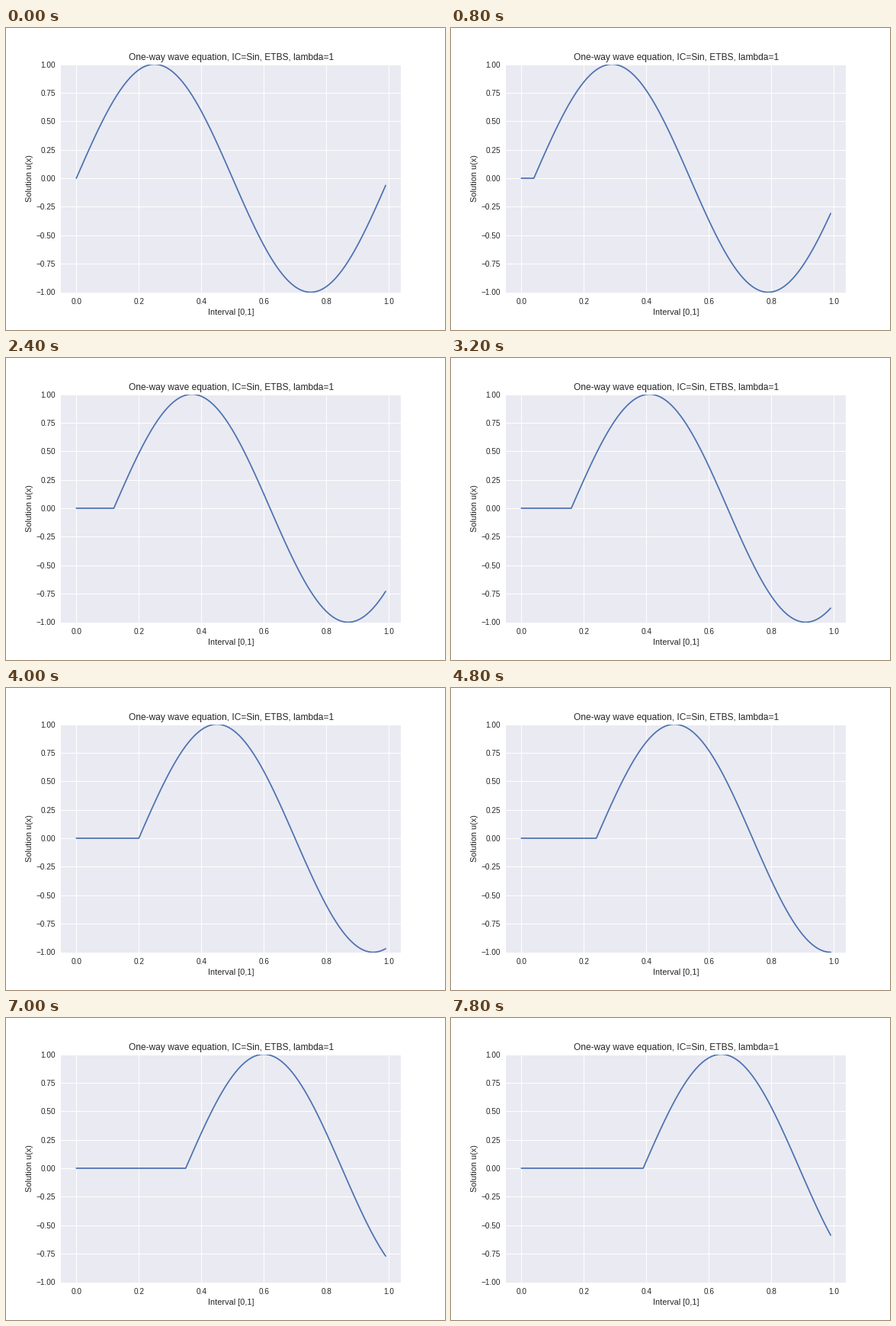
A matplotlib script that plays this animation: 576x396 px, repeating every 8 s.

```python
import numpy as np
import matplotlib.pyplot as plt
from matplotlib.animation import FuncAnimation

INK = "0.15"
PANEL = "#EAEAF2"
BLUE = "#4C72B0"

STEPS = 40          # time steps in one loop
STEP_MS = 200
CELLS = 100
DX = 1 / CELLS

plt.rcParams.update({
    "font.family": "Liberation Sans",
    "text.color": INK,
    "axes.labelcolor": INK,
})

fig = plt.figure(figsize=(8, 5.5), dpi=72, facecolor="white")
fig.subplots_adjust(left=0.125, right=0.9, bottom=0.125, top=0.88)

ax = fig.add_subplot(facecolor=PANEL)
ax.set_axisbelow(True)
ax.grid(color="white", linewidth=1, linestyle="-")
for spine in ax.spines.values():
    spine.set_visible(False)
ax.tick_params(length=0, pad=7, labelsize=10, labelcolor=INK)

x = np.arange(CELLS) * DX
margin = 0.05 * x[-1]
ax.set_xticks(np.linspace(0, 1, 6))
ax.set_yticks(np.linspace(-1, 1, 9))
ax.set_xlim(-margin, x[-1] + margin)
ax.set_ylim(-1, 1)
ax.set_title("One-way wave equation, IC=Sin, ETBS, lambda=1", fontsize=12)
ax.set_xlabel("Interval [0,1]", fontsize=11)
ax.set_ylabel("Solution u(x)", fontsize=11)

line, = ax.plot([], [], color=BLUE, linewidth=1.75, solid_capstyle="round")


def solution(step):
    """With lambda = 1 the wave moves exactly one cell per step."""
    shifted = np.maximum(np.arange(CELLS) - step, 0) * DX
    return np.sin(2 * np.pi * shifted)


def update(step):
    line.set_data(x, solution(step))
    return line,


anim = FuncAnimation(fig, update, frames=STEPS, init_func=lambda: update(0),
                     interval=STEP_MS, repeat=True, repeat_delay=0)
plt.show()
```
